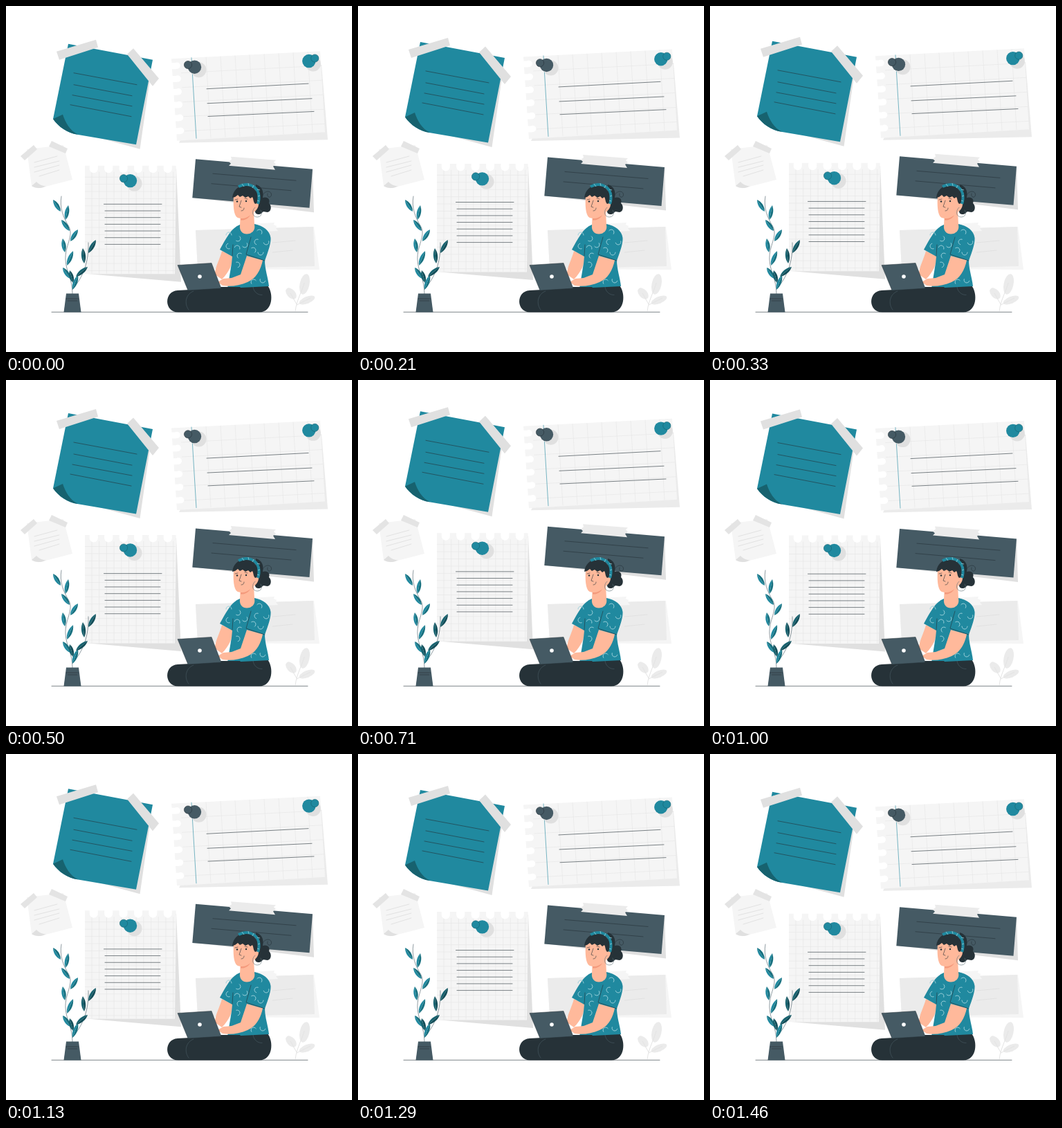
Recreate the animation shown at these times as an HTML page. Size 500 px wide and 500 px high, loop 1500 ms.

```html
<!DOCTYPE html>
<html lang="en">
<head>
<meta charset="utf-8">
<style>
html, body { margin: 0; width: 100%; height: 100%; overflow: hidden; background: #fff; }
svg { display: block; width: 100vw; height: 100vh; }
.line { fill: none; stroke: #263238; stroke-width: .6; stroke-linecap: round; }
.grid { fill: none; stroke: #e3e3e3; stroke-width: .55; }
.teal { fill: #20899f; }
.slate { fill: #455a64; }
.dark { fill: #263238; }
.paper { fill: #f5f5f5; }
.shade { fill: #e0e0e0; }
.pale { fill: #ebebeb; }
.skin { fill: #ffb99b; }
.hole { fill: #fff; }
</style>
</head>
<body>
<svg viewBox="0 0 500 500">
  <!-- still paper at the back -->
  <path class="paper" d="M30 207L83 201L96 251L57 261C49 264 42 264 37 260Z"/>
  <path class="shade" d="M37 260L44 254C48 258 52 260 58 260.500C50 264 43 264 37 260Z"/>
  <path fill="#e4e4e4" d="M21 217L40 201L45 207L27 223ZM66 195L89 206L86 213L62 203Z"/>
  <path class="line" style="stroke:#d4d4d4" d="M41 226L74 217M41 233L77 224M41 240L77 230M48 246L77 237"/>
  <path class="paper" d="M274 324L445 319L453 381L277 380Z"/>
  <path class="pale" d="M274 324L444 319L446 376L277 380Z"/>
  <path class="paper" d="M340 316L388 313L387 316L391 318L390 321L393 325L342 328Z"/>
  <path class="line" style="stroke:#dadada" d="M385 356L414 353M385 342L418 339"/>

  <g id="notes">
    <!-- folded note -->
    <path class="shade" d="M84 177L193.500 207L208 106Z"/>
    <path class="teal" d="M90 55L212 78L188 200.500L103 186C89 184 76 175 68 163.500Z"/>
    <path fill="#17626f" d="M68 163.500L82 157C86 169 92 180 104 186C89 184 76 175 68 163.500Z"/>
    <path class="shade" d="M73 66L130 49L133 60L77 78ZM175 70L184 61.500L221 105L212 116Z"/>
    <path class="line" d="M98 97L189 114M98 114L182 130M96 129L182 145M93 143L181 160"/>

    <!-- wide grid note -->
    <path class="pale" d="M250 198L465 193.500L456 85L254 190Z"/>
    <path class="paper" d="M239 76.500L454 65.500L461 182.500L247 195Z"/>
    <g id="sideHoles" class="hole"></g>
    <path id="wideGrid" class="grid"/>
    <path class="line" style="stroke:#20899f" d="M268 75L275 191.500"/>
    <path class="line" d="M290 120L437 112.400M291 141L442 134M292 159.800L445 152.700"/>

    <!-- tall grid note -->
    <path class="shade" d="M114 387L253 399L246 235Z"/>
    <path class="paper" d="M114 231H245.500L246 240L244 387.500H114Z"/>
    <path id="tallGrid" class="grid"/>
    <g id="topHoles" class="hole"></g>
    <path id="tallLines" class="line"/>

    <!-- slate note -->
    <path class="shade" d="M269 277L445 298.500L443 236Z"/>
    <path class="slate" d="M274 221.500L443 236L438.500 292L269.300 277.600Z"/>
    <path class="pale" d="M325 218L390 223L387 226L390 229L386 232L389 237L322 231L325 228L322 225L326 222Z"/>
    <path class="line" d="M299 242.500L419 252.500M297 257L412 267"/>
    <g id="pins"></g>
  </g>

  <!-- plants and floor -->
  <g class="pale">
    <ellipse cx="431.500" cy="402" rx="7" ry="15" transform="rotate(12 431.500 402)"/>
    <ellipse cx="412" cy="415.500" rx="6" ry="9.500" transform="rotate(-42 412 415.500)"/>
    <ellipse cx="435" cy="425" rx="12" ry="5" transform="rotate(-22 435 425)"/>
    <path fill="none" stroke="#e4e4e4" d="M418 441C420 425 428 412 431 400M420 431L411 415M420 432L440 422"/>
  </g>
  <path class="line" d="M66 442.300H436"/>
  <path class="line" style="stroke:#455a64" d="M80 275C77 292 83 306 91 319C98 333 85 346 86 367C87 385 96 394 96 416M96 409C112 392 120 368 119 342"/>
  <g id="leaves"></g>
  <path class="slate" d="M87 415.500H105L108.500 442.500H83.500Z"/>
  <path class="line" d="M87 423H104M89 426H103"/>

  <!-- woman -->
  <path class="dark" d="M361 258C369 260 373 267 371 277C378 275 382 279 380 285C384 288 384 297 378 298C373 298 372 296 370 299C367 302 360 302 360 297C362 290 360 270 361 258Z"/>
  <path class="line" d="M370 275C374 265 384 267 383.500 273C383 278 376 277 378 271"/>
  <path class="dark" d="M248 411L378 404C387 415 386 442.500 366 442.500H249C228 442.500 228 412 248 411Z"/>
  <path class="line" style="stroke:#4b5d66" d="M271 412C258 417 258 432 264 439M357 406C358 414 365 418 370 417.500"/>
  <path class="skin" d="M312 354L328 362C327 374 322 385 312 395L302 388C302 377 309 366 312 354Z"/>
  <path class="teal" d="M338 316C325 321 318 336 309 352L327 362L326 372L320 408L380 405C379 394 374 380 374 368C380 352 383 342 382.500 335C381 324 372 318 359 315Z"/>
  <path id="pattern" fill="none" stroke="#9bd0da" stroke-linecap="round"/>
  <path class="line" d="M354 334L347 359L374 368M328 345L327 361"/>
  <path class="skin" d="M348 361L371 367.500C368 382 361 394 349 399C338 404 324 406 313 404L306 399L314 394L326 393L339 388Z"/>
  <path class="skin" d="M339 298L358 296L359 316C361 325 354 329.500 348 329.500C342 329.500 337 325 338 317Z"/>
  <path class="skin" d="M329 274C328 288 329 302 334 305.500C341 309 352 306 357 299C361 296 365 292 365 286C364 282 360 284 359 285L360 270L345 262Z"/>
  <path fill="#f49a7c" d="M339 307C345 307.500 350 305 353 302C350 308 344 310 339 309.500Z"/>
  <path class="dark" d="M327 277C329 264 338 258 349 260C360 261 365 272 363 285L360 286C357 283 358 279 356 276L353 278L350 275L346 277L342 274L338 276L335 273L331 276Z"/>
  <path fill="none" stroke="#20899f" stroke-width="4" d="M336 261C349 254 362 260 365 271C366 277 366 281 364 286"/>
  <path fill="none" stroke="#9bd0da" stroke-width=".8" d="M341 257L344 261M350 256L351 260M358 259L356 263M363 265L367 266M364 275L367 274M363 281L366 282"/>
  <path class="line" d="M340 281L337 290L340 291M340 296C343 296 344 294 344 292M331 280L335 279M345 278L349 279"/>
  <g class="dark"><circle cx="334" cy="282.500" r="1.200"/><circle cx="347" cy="282" r="1.200"/></g>
  <path class="line" style="stroke:#60727a" d="M360 291C354 296 356 305 363 305C369 305 371 299 368 295"/>

  <!-- laptop -->
  <path class="dark" d="M264 411L311 406L338 406L340 408L265 411.500Z"/>
  <path class="slate" stroke="#263238" stroke-width=".5" d="M248 374.500L297 371.500L311 408L263 411Z"/>
  <circle cx="280" cy="391" r="2.800" fill="#fff"/>
</svg>
<script>
const LOOP = 1500, RISE = 10, FPS = 24;
const byId = id => document.getElementById(id);
const range = (count, make) => Array.from({ length: count }, (_, i) => make(i)).join('');
const circle = (x, y, r, attrs = '') => `<circle cx="${x}" cy="${y}" r="${r}" ${attrs}/>`;

// Torn edges
byId('sideHoles').innerHTML = range(6, i => {
  const x = 247 + i * 1.1, y = 86.5 + i * 18.8;
  return circle(x, y, 4.8) + `<rect x="${x - 11}" y="${y - 4}" width="10" height="9"/>`;
});
byId('topHoles').innerHTML = range(6, i => {
  const x = 126.8 + i * 21.4;
  return circle(x, 235.5, 6) + `<rect x="${x - 6}" y="229" width="12" height="6"/>`;
});

// Ruling
byId('wideGrid').setAttribute('d',
  range(8, i => `M${289 + i * 21} ${74 - i * 1.08}l7 117`) +
  range(5, i => `M${253 + i * 1.2} ${97 + i * 21}l203 -10.500`));
byId('tallGrid').setAttribute('d',
  range(12, i => `M${124 + i * 10.7} 240V387`) +
  range(14, i => `M114 ${247.5 + i * 10.4}H245`));
byId('tallLines').setAttribute('d',
  range(7, i => `M${i ? 143 : 141.5} ${286.6 + i * 9.68}H${i ? 223 : 225}`));

// Pins: head, knob and cast shadow
const pin = (x, y, knobX, knobY, color, edge) =>
  circle(x + 6, y + 4, 11, 'class="shade"') +
  circle(x, y, 9.7, `fill="${color}"`) +
  circle(knobX, knobY, 5.6, `fill="${color}" stroke="${edge}" stroke-width=".6"`);
byId('pins').innerHTML =
  pin(272.5, 88.5, 263, 85.3, '#455a64', '#263238') +
  pin(437.8, 79.8, 446.3, 75.8, '#20899f', '#17626f') +
  pin(179.5, 252.9, 170, 249.5, '#20899f', '#17626f');

// Leaves run from base to tip, one half darker
function leaf([x, y, tipX, tipY], i) {
  const length = Math.hypot(tipX - x, tipY - y);
  const angle = Math.atan2(tipY - y, tipX - x) * 180 / Math.PI;
  const half = side => `M0 0C${length * .3} ${side * 4.2} ${length * .7} ${side * 4} ${length} 0Z`;
  const [light, dark] = i < 8 ? ['#20899f', '#17707f'] : ['#17626f', '#124d58'];
  return `<g transform="translate(${x} ${y}) rotate(${angle})">
    <path fill="${light}" d="${half(-1)}"/><path fill="${dark}" d="${half(1)}"/></g>`;
}
byId('leaves').innerHTML = [
  [79, 297, 68, 280], [86, 309, 90, 288], [92, 325, 80, 309], [93, 340, 104, 323],
  [85, 356, 82, 336], [88, 375, 97, 354], [93, 394, 82, 378], [96, 410, 104, 389],
  [97, 400, 92, 382], [101, 391, 118, 377], [113, 372, 111, 350], [119, 357, 130, 338]
].map(leaf).join('');

// Shirt print: small arcs facing different ways
byId('pattern').setAttribute('d', [
  [322, 331], [335, 336], [322, 347], [334, 350], [345, 345], [353, 324], [366, 327], [376, 341],
  [363, 341], [357, 353], [368, 356], [338, 361], [334, 374], [371, 396], [358, 399]
].map(([x, y], i) => {
  const a = i * 2.2, dx = 4 * Math.cos(a), dy = 4 * Math.sin(a);
  return `M${x - dx} ${y - dy}A4 4 0 0 1 ${x + dx} ${y + dy}`;
}).join(''));

// Steady rise and fall, stepped at the frame rate
function draw() {
  const step = Math.floor((performance.now() % LOOP) * FPS / 1000) + .5;
  const phase = step / (LOOP * FPS / 1000);
  const lift = RISE * (1 - Math.abs(1 - 2 * phase));
  byId('notes').setAttribute('transform', `translate(0 ${-lift})`);
  requestAnimationFrame(draw);
}
draw();
</script>
</body>
</html>
```
